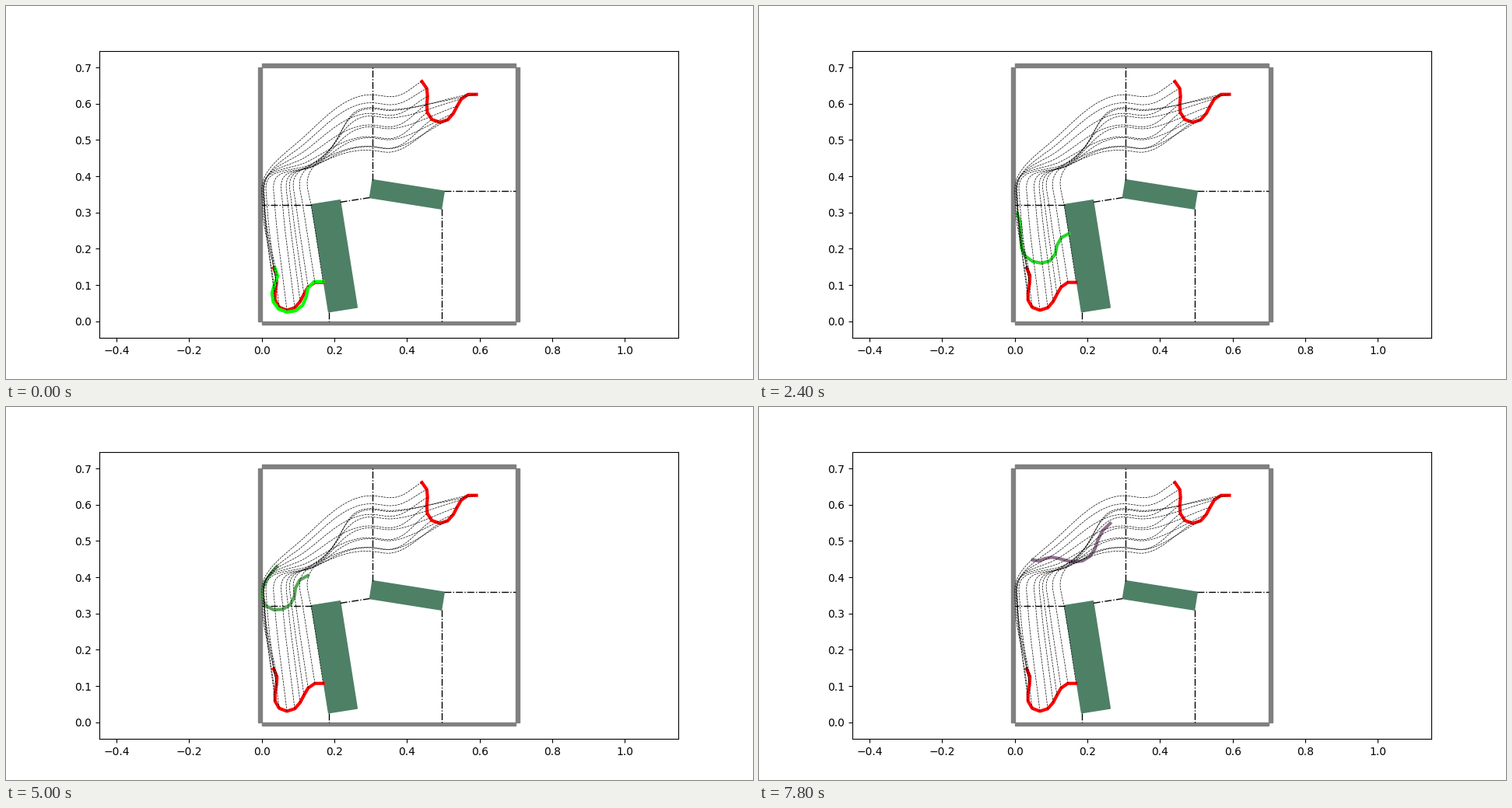
These frames come from a looping animation (960 px wide and 480 px high, 8000 ms). A matplotlib script:

```python
import matplotlib.pyplot as plt
import numpy as np
from matplotlib.animation import FuncAnimation
from matplotlib.patches import Rectangle

FRAMES, INTERVAL = 40, 200
SCALE, LEFT, BASE = 466.67, 328.67, 405.73  # axes units to stage pixels
NODES = 13
FULL_RUN = 70  # frames until the moving rope has fully changed colour
BENDS = [0, 1, 3, 5, 7, 9, 11]  # rope links whose headings are given


def to_data(points):
    return np.stack([points[..., 0] - LEFT, BASE - points[..., 1]], -1) / SCALE


def smooth(t, values, at):
    """Cubic Hermite curve through values, along the first axis."""
    t, values = np.asarray(t, float), np.asarray(values, float)
    at = np.atleast_1d(at)
    slope = np.gradient(values, t, axis=0)
    i = np.clip(np.searchsorted(t, at, "right") - 1, 0, len(t) - 2)
    shape = (-1,) + (1,) * (values.ndim - 1)
    h = (t[i + 1] - t[i]).reshape(shape)
    u = (at - t[i]).reshape(shape) / h
    return ((1 + 2 * u) * (1 - u) ** 2 * values[i]
            + u * (1 - u) ** 2 * h * slope[i]
            + u * u * (3 - 2 * u) * values[i + 1]
            + u * u * (u - 1) * h * slope[i + 1])


def rope(x, y, link, stretch, *headings):
    """Chain of links around its middle node; stretch lengthens the later links."""
    k = np.arange(NODES - 1)
    angle = np.radians(smooth(BENDS, headings, k))
    length = link + stretch * (k - k.mean())
    steps = length[:, None] * np.stack([np.cos(angle), np.sin(angle)], -1)
    nodes = np.vstack([np.zeros(2), np.cumsum(steps, axis=0)])
    return nodes - nodes[NODES // 2] + (x, y)


def plan(start, goal):
    """Waypoints of every node: up the wall, round the corner, across to the goal."""
    k = np.arange(NODES)
    u = k / (NODES - 1)
    lane = np.maximum(start[:, 0] - 15.5, 329.5 + 0.6 * k)
    cross = goal[:, 1] + 17 + 19 * np.sin(np.pi * u) ** 2

    def row(x, y):
        return np.stack([x + 0 * u, y + 0 * u], -1)

    return [start,
            row(lane, 256),
            row(lane - 5 * u ** 2, 228),
            row(380 + 40 * u ** 2, 171 + 32 * np.sin(np.pi * u) + 9 * u),
            row(470, cross),
            row(492, cross + 2.5),
            goal]


start = rope(361, 391.5, 10.6, 0, 67, 93, 90, 21, -49, -60, 0)
fade = np.exp(-np.arange(NODES) / 2.5)[:, None]
goal = start + (197, -242) + fade * (-6.5, 2)

poses = {
    0: rope(361, 394, 11.5, 0, 71, 110, 82, 21, -38, -79, 0),
    8: rope(355, 350, 11.3, 0, 66, 93, 85, 34, -15, -80, -29),
    17: rope(348, 302.5, 11.3, 0, 85, 85, 85, 34, -20, -77, -24),
    25: rope(344, 261, 11.5, 0, 131, 124, 95, 27, -31, -82, -29),
    31: rope(354, 236, 11.9, 0.6, 169, 165, 70, 19, -43, -53, -38),
    39: rope(405, 199.5, 10.6, 0.5, 9, -21, 10, 11, -32, -72, -44),
}
track = to_data(np.array(list(poses.values())))

fig = plt.figure(figsize=(9.6, 4.8), dpi=100)
ax = fig.add_subplot()
half_width = 744 / SCALE / 2
ax.set_xlim(0.35 - half_width, 0.35 + half_width)
ax.set_ylim(-0.046, 0.746)

# room walls
for x, y, w, h in [(-0.01, 0, 0.01, 0.7), (0.7, 0, 0.01, 0.7),
                   (0, -0.01, 0.7, 0.01), (0, 0.7, 0.7, 0.01)]:
    ax.add_patch(Rectangle((x, y), w, h, color="gray"))

# tilted obstacles
for cx, cy, w, h, angle in [(0.2, 0.18, 0.08, 0.3, 9), (0.4, 0.35, 0.2, 0.05, -9)]:
    ax.add_patch(Rectangle((cx - w / 2, cy - h / 2), w, h, angle=angle,
                           rotation_point="center", color="#4e8066"))

# gaps between obstacles and walls
for xs, ys in [((0.305, 0.305), (0.3903, 0.7)), ((0.5027, 0.7), (0.359, 0.359)),
               ((0.4955, 0.4955), (0.31, 0)), ((0.137, 0), (0.3207, 0.3207)),
               ((0.2166, 0.297), (0.3285, 0.341)), ((0.185, 0.185), (0.0257, 0))]:
    ax.plot(xs, ys, "k-.", lw=1)

for pose in (start, goal):
    ax.plot(*to_data(pose).T, color="red", lw=3, zorder=2.1)
moving, = ax.plot([], [], lw=3, zorder=2.2)

pace = [0, 4, 5, 7.5, 11, 11.7, 14]
paths = smooth(pace, to_data(np.array(plan(start, goal))), np.linspace(0, 14, 150))
for k in range(NODES):
    ax.plot(*paths[:, k].T, "k--", lw=0.5, zorder=2.3)


def update(frame):
    moving.set_data(*smooth(list(poses), track, frame)[0].T)
    mix = frame / FULL_RUN
    moving.set_color((mix, 1 - mix, mix))
    return moving,


anim = FuncAnimation(fig, update, frames=FRAMES, interval=INTERVAL,
                     repeat=True, repeat_delay=0)
plt.show()
```
